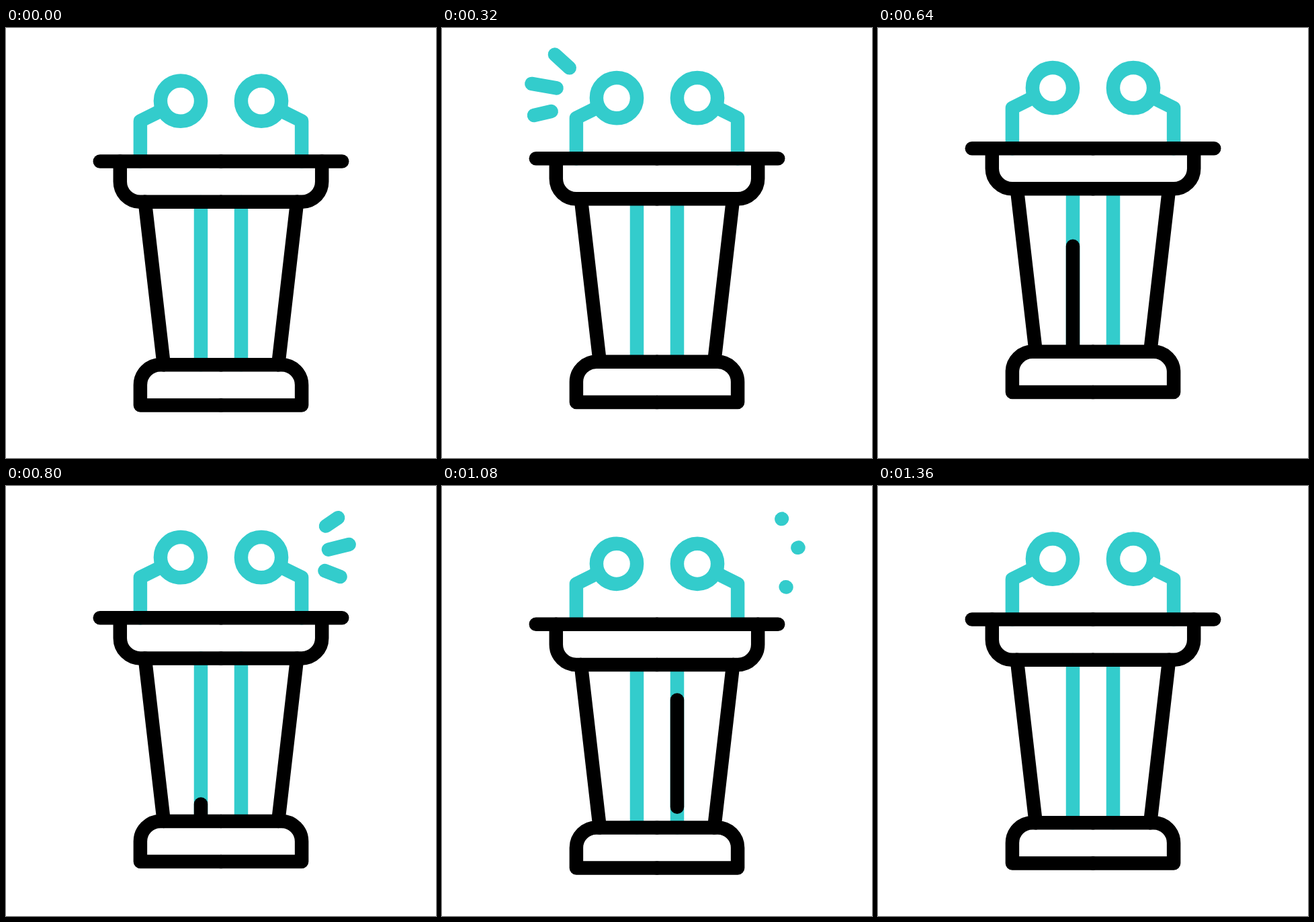
These frames come from a looping animation (640 by 640 pixels, 1.48 s). An HTML page:

```html
<!DOCTYPE html>
<html lang="en">
<head>
<meta charset="utf-8">
<title>Podium</title>
<style>
  html, body { margin: 0; width: 100%; height: 100%; overflow: hidden; background: #fff; }
  svg { display: block; width: 100vw; height: 100vh; }
  g { fill: none; stroke-width: 20.5; stroke-linecap: round; stroke-linejoin: round; }
  .teal { stroke: #33cccc; }
  .black { stroke: #000; }
</style>
</head>
<body>
<svg viewBox="0 0 640 640">
  <g id="podium">
    <g id="half">
      <g class="teal">
        <circle cx="260" cy="108.6" r="30.1"/>
        <path d="M199.9 198.6V138.4L233 122"/>
        <path d="M290 259V501"/>
      </g>
      <g class="black">
        <path d="M139.8 198.6H320"/>
        <path d="M169.8 198.6v30.2a30 30 0 0 0 30 30H320"/>
        <path d="M206.8 258.8L234.8 501.3"/>
        <path d="M320 501.3H229.9a30 30 0 0 0-30 30V561.4H320"/>
      </g>
    </g>
    <use href="#half" transform="matrix(-1 0 0 1 640 0)"/>
    <g class="teal burst">
      <path d="M190 64L162.5 39"/>
      <path d="M171 94L124 85.8"/>
      <path d="M163 128.5L130.5 136"/>
    </g>
    <g class="teal burst">
      <path d="M476 62L506 41.5"/>
      <path d="M480 97L530.5 84.4"/>
      <path d="M474.5 128.5L512.5 143.3"/>
    </g>
    <g class="black runner"><path d="M290 259V501"/></g>
    <g class="black runner"><path d="M350 259V501"/></g>
  </g>
</svg>
<script>
const LOOP = 1480, STEP = 40;
const podium = document.getElementById('podium');
const bursts = document.querySelectorAll('.burst');
const runners = document.querySelectorAll('.runner');

// Eased progress from 0 to 1 between two times
const ease = (t, from, to) => {
  const u = Math.min(1, Math.max(0, (t - from) / (to - from)));
  return u * u * (3 - 2 * u);
};

// Show only the part of each path between two fractions of its length
function trim(group, start, end) {
  group.style.visibility = end > start ? 'visible' : 'hidden';
  for (const path of group.children) {
    path.setAttribute('pathLength', 1);
    path.setAttribute('stroke-dasharray', `${end - start} 2`);
    path.setAttribute('stroke-dashoffset', -start);
  }
}

function draw(t) {
  const y = -20 * ease(t, 199, 595) + 30 * ease(t, 613, 948) - 10 * ease(t, 948, 1325);
  podium.setAttribute('transform', `translate(0 ${y})`);

  // The right side repeats the left side's motion later
  bursts.forEach((burst, side) => {
    const local = t - side * 520;
    trim(burst, ease(local, 304, 584), ease(local, 120, 400));
  });
  runners.forEach((runner, side) => {
    const local = t - side * 480;
    trim(runner, ease(local, 480, 880), ease(local, 320, 680));
  });
}

// Motion advances at 25 steps per second
function tick() {
  const t = (performance.now() + 10) % LOOP;
  draw(Math.floor(t / STEP) * STEP);
  requestAnimationFrame(tick);
}
tick();
</script>
</body>
</html>
```
